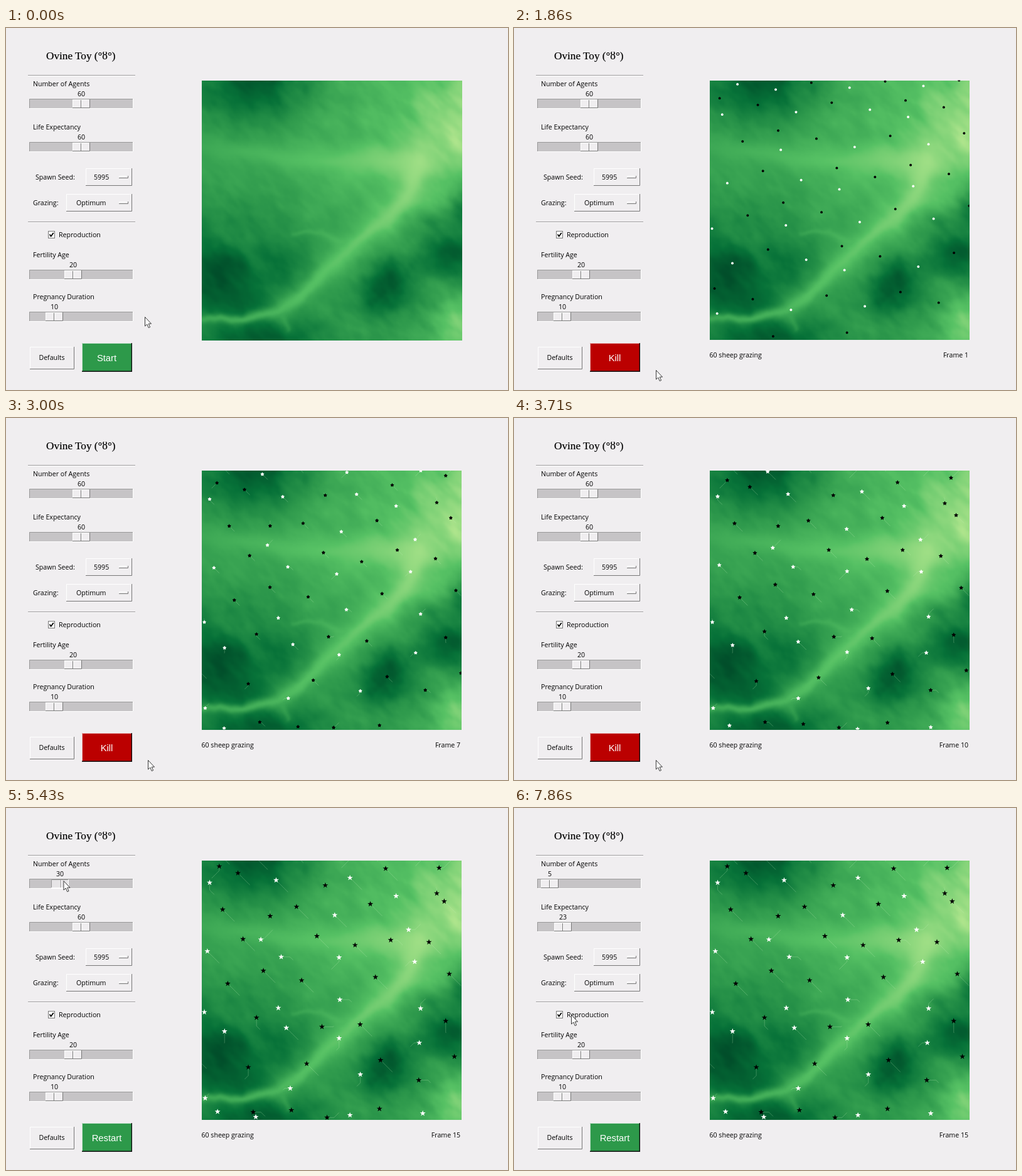
Write an HTML page with a canvas that moves like this. It is 800 px wide and 578 px high and loops after 8 s.

```html
<!DOCTYPE html>
<html lang="en">
<head>
<meta charset="utf-8">
<title>Grazing simulation</title>
<style>
html, body { margin: 0; width: 100%; height: 100%; overflow: hidden; background: #f0eef0; }
canvas, svg { position: absolute; left: 0; top: 0; }
text { font: 10.6px "Open Sans", "Noto Sans", sans-serif; fill: #000; white-space: pre; }
.title { font: 17.2px "Liberation Serif", "DejaVu Sans", serif; stroke: #000; stroke-width: .2; }
.action { font: 14.8px "Liberation Sans", sans-serif; fill: #fff; }
.light, .dark { fill: none; stroke: #fff; }
.dark { stroke: #777; }
.face { fill: #f0eef0; }
.down .face { fill: #e6e4e6; }
.down .light { stroke: #999; }
.down .dark { stroke: #fff; }
</style>
</head>
<body>
<canvas id="field" width="800" height="578"></canvas>
<svg id="ui" width="800" height="578"></svg>
<script>
const MAP = { x: 311.5, y: 83.5, size: 414 };
const LOOP = 8000, TICK = 1000 / 7;
const clamp = (v, lo, hi) => Math.min(hi, Math.max(lo, v));
const mix = (a, b, f) => a + (b - a) * f;
const fraction = v => v - Math.floor(v);
const hash = (i, j) => fraction(Math.sin(i * 127.1 + j * 311.7) * 43758.5453);

// ---------- terrain ----------
const ramp = [[0, 72, 40], [6, 113, 56], [46, 153, 76], [86, 193, 100], [178, 230, 142]];

// Hollows and hills on a plain that rises to the upper right: x, y, radius, lift
const bumps = [
  [400, 65, 80, -.5], [330, 390, 70, -.4], [455, 370, 45, -.15], [400, 505, 90, -.4], [605, 410, 40, -.45],
  [705, 355, 55, -.4], [730, 280, 35, -.3], [726, 170, 80, .25], [725, 475, 55, .3]
];
const river = [[312, 464], [375, 462], [430, 450], [470, 428], [550, 345], [600, 305], [640, 262], [658, 215]];
const valley = [[312, 190], [480, 210], [650, 212]];

function pointAlong(line, f) {
  const s = f * (line.length - 1), i = Math.min(Math.floor(s), line.length - 2);
  return line[i].map((v, axis) => mix(v, line[i + 1][axis], s - i));
}

// Width and level run from the first to the second value along the line.
const ridges = [
  { line: valley, width: [15, 26], level: [.6, .9] },
  { line: river, width: [6, 20], level: [.6, .95] },
  { line: [[550, 345], [500, 324], [455, 326]], width: [6, 4], level: [.72, .55] }
];
function addSpurs(line, dx, dy, level) {
  for (let f = .3; f < 1; f += .14) {
    const [x, y] = pointAlong(line, f);
    const reach = .6 + .6 * hash(f * 50, dy);
    ridges.push({ line: [[x, y], [x + dx * reach, y + dy * reach]], width: [7, 4], level: [level + f * .2, level - .1] });
  }
}
addSpurs(river, 14, 34, .56);
addSpurs(valley, -36, -56, .58);

function noise(x, y) {
  const i = Math.floor(x), j = Math.floor(y), ease = f => f * f * (3 - 2 * f);
  const u = ease(x - i), v = ease(y - j);
  return mix(mix(hash(i, j), hash(i + 1, j), u), mix(hash(i, j + 1), hash(i + 1, j + 1), u), v) - .5;
}
const fbm = (x, y) => noise(x, y) + noise(x * 2, y * 2) / 2 + noise(x * 4, y * 4) / 4;

function baseHeight(x, y) {
  const u = (x - MAP.x) / MAP.size, v = (y - MAP.y) / MAP.size;
  return bumps.reduce((h, [bx, by, radius, lift]) =>
    h + lift * Math.exp(-((x - bx) ** 2 + (y - by) ** 2) / radius ** 2), .5 + .25 * u * (1 - v));
}

function raiseRidge(h, x, y, { line, width, level }) {
  const segments = line.length - 1;
  let best = Infinity, along = 0;
  for (let s = 0; s < segments; s++) {
    const [ax, ay] = line[s], dx = line[s + 1][0] - ax, dy = line[s + 1][1] - ay;
    const f = clamp(((x - ax) * dx + (y - ay) * dy) / (dx * dx + dy * dy), 0, 1);
    const d = Math.hypot(x - ax - dx * f, y - ay - dy * f);
    if (d < best) { best = d; along = (s + f) / segments; }
  }
  const lift = Math.max(0, mix(...level, along) - h);
  const q = best / mix(...width, along);
  return h + lift * (.6 * Math.exp(-q * q) + .35 * Math.exp(-q * q / 9));
}

function paintTerrain() {
  const n = 207, tile = document.createElement('canvas');
  tile.width = tile.height = n;
  const ctx = tile.getContext('2d'), image = ctx.createImageData(n, n);
  for (let row = 0; row < n; row++) for (let col = 0; col < n; col++) {
    const px = MAP.x + col * 2, py = MAP.y + row * 2;
    const wx = 18 * fbm(px / 34, py / 34), wy = 18 * fbm(px / 34 + 40, py / 34);
    let h = baseHeight(px + wx, py + wy) + .12 * fbm((px + py) / 60, (py - px) / 28);
    for (const ridge of ridges) h = raiseRidge(h, px + wx * .35, py + wy * .35, ridge);
    const level = clamp(h, 0, .999) * 4, i = Math.floor(level);
    const at = (row * n + col) * 4;
    for (let c = 0; c < 3; c++) image.data[at + c] = mix(ramp[i][c], ramp[i + 1][c], level - i);
    image.data[at + 3] = 255;
  }
  ctx.putImageData(image, 0, 0);
  return tile;
}

// ---------- sheep ----------
// Evenly scattered; most of them head up and to the left.
const sheep = Array.from({ length: 60 }, (_, i) => {
  const goal = axis => hash(i, axis) < .62 ? -19 : mix(-12, 16, hash(i, axis + 5));
  return {
    color: i < 26 ? '#fff' : '#000',
    x: MAP.x + MAP.size * fraction(.5 + i * .7549),
    y: MAP.y + MAP.size * fraction(.5 + i * .5698) ** 1.25,
    dx: goal(1), dy: goal(2)
  };
});

// Each axis advances at a fixed pace until it arrives.
function place({ x, y, dx, dy }, step) {
  const reach = 1.42 * Math.max(0, step - 1);
  return [x + clamp(dx, -reach, reach), y + clamp(dy, -reach, reach)];
}

const ctx = field.getContext('2d'), terrain = paintTerrain();

function drawStar(x, y, step) {
  ctx.beginPath();
  for (let i = 0; i < 10; i++) {
    const r = i % 2 ? 1.9 : 2.1 + .19 * Math.max(0, step - 1), a = i * Math.PI / 5 - Math.PI / 2;
    ctx.lineTo(x + r * Math.cos(a), y + r * Math.sin(a));
  }
  ctx.fill();
}

function drawField(step) {
  const size = MAP.size + (step < 0 ? 1 : 0);
  ctx.clearRect(0, 0, 800, 578);
  ctx.drawImage(terrain, MAP.x, MAP.y, size, size);
  if (step < 0) return;
  ctx.save();
  ctx.beginPath();
  ctx.rect(MAP.x, MAP.y, size, size);
  ctx.clip();
  ctx.strokeStyle = 'rgba(200,240,190,.4)';
  ctx.lineWidth = .7;
  for (const one of sheep) {
    ctx.beginPath();
    for (let s = 1; s <= step; s++) ctx.lineTo(...place(one, s));
    ctx.stroke();
  }
  const wrap = (v, edge) => edge + (v - edge + size) % size;
  for (const one of sheep) {
    const [x, y] = place(one, step);
    ctx.fillStyle = one.color;
    drawStar(wrap(x, MAP.x), wrap(y, MAP.y), step);
  }
  ctx.restore();
}

// ---------- control panel ----------
const label = (x, y, s, attrs = '') => `<text x="${x}" y="${y}" ${attrs}>${s}</text>`;
const centred = 'text-anchor="middle"';
const bevel = (x, y, w, h, face = 'class="face"') => `<rect x="${x}" y="${y}" width="${w}" height="${h}" ${face}/>
  <path class="light" d="M${x + .5} ${y + h}V${y + .5}H${x + w}"/>
  <path class="dark" d="M${x + w - .5} ${y}V${y + h - .5}H${x}"/>`;
const divider = y => `<path d="M35 ${y}.5H206" stroke="#9c9a9c"/><path d="M35 ${y + 1}.5H206" stroke="#fff"/>`;
const slider = (name, y, value, x, id) => label(43, y - 28, name) + `
  <g class="down">${bevel(37, y - 8, 166, 16, 'fill="#c6c4c6"')}</g>
  <g id="${id}" transform="translate(${x})">
    ${label(14, y - 12.5, value, centred)}
    ${bevel(0, y - 7, 28, 14)}
    <path class="dark" d="M13.5 ${y - 6}v12"/><path class="light" d="M14.5 ${y - 6}v12"/>
  </g>`;
const menu = (name, nameX, x, y, value, valueX) => label(nameX, y + 4, name) +
  bevel(x, y - 14, 201 - x, 28) + label(valueX, y + 4, value) + bevel(180, y - 2, 15, 4);

ui.innerHTML = label(64, 50, 'Ovine Toy (°ȣ°)', 'class="title"') +
  divider(75) + slider('Number of Agents', 121, 60, 106, 'agents') +
  slider('Life Expectancy', 190, 60, 106, 'life') +
  menu('Spawn Seed:', 47, 127, 238, '5995', 140) + menu('Grazing:', 43, 96, 279, 'Optimum', 112) +
  divider(309) + `<rect x="67.5" y="324.5" width="10" height="11" fill="#fff" stroke="#777"/>
  <path d="M69.5 329.5l2.2 3 4-5.5" fill="none" stroke="#000" stroke-width="1.8"/>` +
  label(84, 334, 'Reproduction') +
  slider('Fertility Age', 394, 20, 93) + slider('Pregnancy Duration', 461, 10, 63) +
  bevel(38, 509, 71, 36) + label(73, 530, 'Defaults', centred) +
  `<rect id="button" x="121" y="503" width="80" height="46"/>
  <path d="M121.5 549V503.5H201" fill="none" stroke="#fff" opacity=".7"/>
  <path d="M200.3 503V548.3H121" fill="none" stroke="#111" stroke-width="1.4"/>` +
  label(160.5, 531.5, '', `id="action" class="action" ${centred}`) +
  label(311.5, 525.5, '', 'id="count"') + label(724, 525.5, '', 'id="counter" text-anchor="end"') +
  `<path id="pointer" d="M.5 .5V15l3.3-3 2.4 5.6 2.4-1-2.4-5.4h4.3Z" fill="#fff" stroke="#222" stroke-width=".9"/>`;

const byId = id => document.getElementById(id);

// ---------- timeline ----------
const linear = f => f, easeOut = f => 1 - (1 - f) ** 3;
const move = (start, end, x, y, ease = linear) => ({ start, end, x, y, ease });
const progress = ({ start, end, ease }, t) => ease(clamp((t - start) / (end - start), 0, 1));

const dragAgents = move(5110, 5700, 62, 116);
const dragLife = move(6250, 7150, 83, 183, easeOut);
const moves = [
  move(250, 850, 163, 528), move(1200, 1700, 226, 546), move(3570, 4140, 177, 526), move(4500, 5000, 126, 116),
  dragAgents, move(5860, 6150, 125, 183), dragLife, move(7150, 7650, 91, 330)
];

function pointerAt(t) {
  let x = 221, y = 461;
  for (const step of moves) {
    const f = progress(step, t);
    x = mix(x, step.x, f);
    y = mix(y, step.y, f);
  }
  return [x, y];
}

function setSlider(id, drag, from, to, t) {
  const value = Math.round(mix(from, to, progress(drag, t))), group = byId(id);
  group.setAttribute('transform', `translate(${Math.round(37.3 + value * 1.145)})`);
  group.setAttribute('class', t >= drag.start && t < drag.end ? 'down' : '');
  group.querySelector('text').textContent = value;
}

function render(t) {
  const step = t < 1420 ? -1 : clamp(Math.floor(1 + (t - 1800) / 187), 0, 15);
  drawField(step);
  byId('count').textContent = step < 0 ? '' : '60 sheep grazing';
  byId('counter').textContent = step < 0 ? '' : `Frame ${step}`;
  const action = t < 1140 ? 'Start' : t < 4420 ? 'Kill' : 'Restart';
  byId('action').textContent = action;
  byId('button').setAttribute('fill', action === 'Kill' ? '#bb0000' : '#2d994a');
  setSlider('agents', dragAgents, 60, 5, t);
  setSlider('life', dragLife, 60, 23, t);
  byId('pointer').setAttribute('transform', `translate(${pointerAt(t)})`);
}

let start, shown = -1;
function loop(now) {
  start ??= now;
  const tick = Math.floor((now - start) % LOOP / TICK);
  if (tick !== shown) render((shown = tick) * TICK);
  requestAnimationFrame(loop);
}
render(0);
requestAnimationFrame(loop);
</script>
</body>
</html>
```
